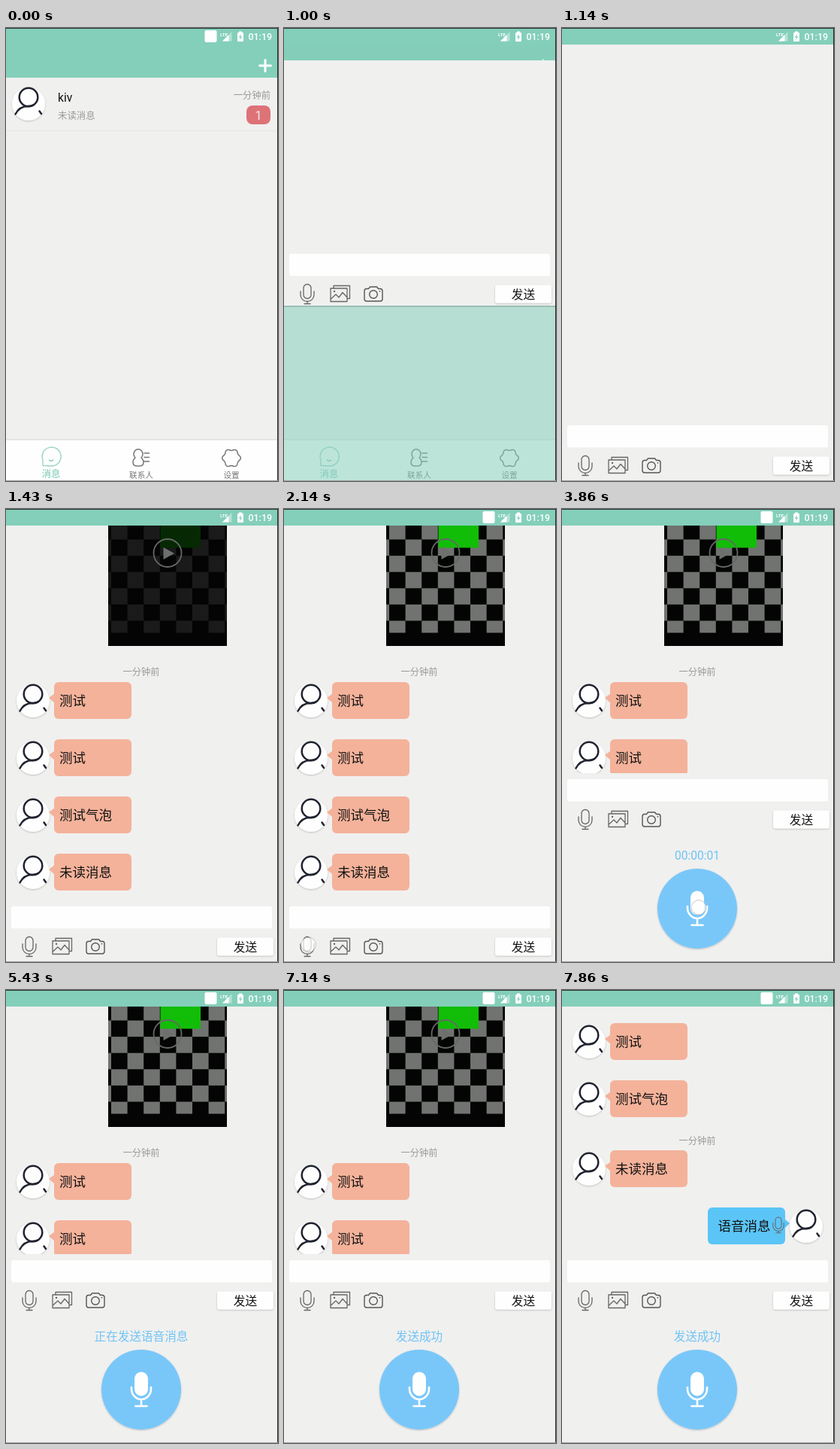
Write an HTML page that moves like this. It is 362 px wide and 602 px high and loops after 8000 ms.

```html
<!DOCTYPE html>
<html lang="zh-CN">
<head>
<meta charset="utf-8">
<title>Chat app</title>
<style>
html, body { margin: 0; width: 100%; height: 100%; overflow: hidden; background: #f0f0ef; }
svg { display: block; width: 100vw; height: 100vh; }
text { font-family: Roboto, "Noto Sans CJK SC", "Noto Sans CJK", sans-serif; }
.line { fill: none; stroke-linecap: round; stroke-linejoin: round; }
</style>
</head>
<body>
<svg id="stage" viewBox="0 0 362 602" xmlns="http://www.w3.org/2000/svg"></svg>
<script>
const LOOP = 8000;
const GREEN = '#84cfba', PAPER = '#f0f0ef', PEACH = '#f4b29a', BLUE = '#5bc5f7', SKY = '#6fc4f5';

const rect = (x, y, w, h, fill, more = '') =>
  `<rect x="${x}" y="${y}" width="${w}" height="${h}" fill="${fill}" ${more}/>`;
const circle = (x, y, r, more) => `<circle cx="${x}" cy="${y}" r="${r}" ${more}/>`;
const line = (d, color, width = 1.4) =>
  `<path class="line" d="${d}" stroke="${color}" stroke-width="${width}"/>`;
const label = (s, x, y, size, fill, anchor = 'start', more = '') =>
  `<text x="${x}" y="${y}" font-size="${size}" fill="${fill}" text-anchor="${anchor}" ${more}>${s}</text>`;
const at = (x, y, body) => `<g transform="translate(${x} ${y})">${body}</g>`;
const layer = (id, body) => `<g id="${id}">${body}</g>`;

const avatar = (x, y) => at(x, y,
  circle(0, 0, 22, 'fill="#fefefe" filter="url(#soft)"') +
  circle(0, -9, 12.3, 'fill="none" stroke="#20232f" stroke-width="2.5"') +
  line('M-17.5 13.5Q-12 3 -1 3Q4 3 7 1M14.5 9.5L17 13', '#20232f', 2.5));

const mic = (x, y, scale = 1) => at(x, y, `<g transform="scale(${scale})">` +
  rect(-5, -12.5, 10, 19, 'none', 'rx="5" stroke="#666" stroke-width="1.3"') +
  line('M-9 -3V1.5A9 9 0 0 0 9 1.5V-3M0 10.5V13.5M-4 13.5H4', '#666', 1.3) + '</g>');

const bubble = (y, s) => avatar(36, y + 25) +
  `<path d="M57 ${y + 21}L65 ${y + 15}V${y + 28}Z" fill="${PEACH}"/>` +
  rect(64, y, 103, 49, PEACH, 'rx="6"') + label(s, 71, y + 31, 17.5, '#111');

const timeNote = y => label('一分钟前', 180, y, 12.3, '#9a9a9a', 'middle');

function gearPath() {
  let d = '';
  for (let i = 0; i < 72; i++) {
    const a = i * Math.PI / 36, r = 11.2 + 1.1 * Math.cos(6 * a);
    d += (i ? 'L' : 'M') + (r * Math.cos(a)).toFixed(2) + ' ' + (r * Math.sin(a)).toFixed(2);
  }
  return d + 'Z';
}

function listScreen() {
  return rect(0, 0, 362, 602, PAPER) + rect(0, 0, 362, 66, GREEN) +
    line('M337.5 50H352.5M345 42.5V57.5', '#fff', 3) +
    rect(0, 136, 362, 1, '#e6e6e5') + avatar(30, 101) +
    label('kiv', 69, 98, 15.6, '#111') +
    label('未读消息', 69, 121, 12.4, '#999') +
    label('一分钟前', 352, 94, 12.3, '#999', 'end') +
    layer('badge', rect(320, 103, 32, 25, '#dd7377', 'rx="8"') +
      label('1', 336, 121.5, 17, '#f6e4e4', 'middle')) +
    rect(0, 546, 362, 2, '#e6e6e5') + rect(0, 548, 362, 54, '#fefefe') +
    line('M49 581.5V574A12.5 12.5 0 1 1 60 582Z', '#9ad5c5') +
    line('M57.5 574Q60 577 62.5 574', '#7fcbb6') +
    label('消息', 60, 596.5, 12.2, '#72c6b0', 'middle') +
    line('M172 571A6 6.5 0 1 1 180 571Q183 573.5 183 577Q183 582 178 582H174Q169 582 169 577Q169 573.5 172 571' +
      'M184 565H190.5M184 570.5H190.5M184 576H190.5', '#777', 1.5) +
    label('联系人', 180, 597.5, 10.6, '#777', 'middle') +
    at(300, 571.5, line(gearPath(), '#777', 1.5)) +
    label('设置', 300, 597.5, 10.6, '#777', 'middle');
}

function video() {
  const cell = 21.6, bottom = 164.5;
  let squares = '';
  for (let row = 0; row < 7; row++) {
    const y0 = row ? 40.5 + (row - 1) * cell : 22;
    const y1 = Math.min(40.5 + row * cell, bottom);
    for (let col = -1; col < 8; col++) {
      if ((row + col) % 2) continue;
      const x0 = Math.max(136, 140 + col * cell), x1 = Math.min(294, 140 + (col + 1) * cell);
      if (x1 > x0) squares += rect(x0, y0, x1 - x0, y1 - y0, '#707370');
    }
  }
  return rect(136, 22, 158, 160, '#030403') +
    layer('clip', squares + rect(205.5, 22, 53.5, 29.5, '#12bd07')) +
    circle(215, 58.5, 18.5, 'fill="none" stroke="#666866" stroke-width="1.8"') +
    '<path d="M209.5 51L224 59L209.5 67Z" fill="#6d706d"/>';
}

const firstMessages = () => video() + timeNote(221) +
  ['测试', '测试', '测试气泡', '未读消息'].map((s, i) => bubble(230 + 76 * i, s)).join('');

const lastMessages = () => bubble(44, '测试') + bubble(120, '测试气泡') +
  timeNote(204.5) + bubble(213, '未读消息') +
  `<path d="M303 310L296 304V317Z" fill="${BLUE}"/>` +
  rect(194, 289, 103, 49, BLUE, 'rx="6"') +
  label('语音消息', 207.5, 320, 17.5, '#111') + mic(288, 312, 0.8) + avatar(325, 314);

function composer() {
  return rect(0, 520, 362, 300, PAPER) +
    rect(7, 528, 347, 29.5, '#fefefe', 'rx="3"') + mic(31, 581) +
    line('M66 574V570.5H87.5V587.5H84M62 574H84V591.5H62ZM62.5 588L69 582L73 586L78 579.5L84 586', '#666', 1.3) +
    circle(67, 578, 1.2, 'fill="#666"') +
    line('M110 574.5H112.5L114.5 572H123.5L125.5 574.5H128Q131 574.5 131 577.5V588Q131 591 128 591H110Q107 591 107 588V577.5Q107 574.5 110 574.5Z', '#555', 1.4) +
    circle(119, 582, 5.3, 'fill="none" stroke="#555" stroke-width="1.4"') +
    circle(127.5, 577.8, 0.9, 'fill="#555"') +
    rect(281, 569.5, 75, 24, '#fefefe', 'rx="3" filter="url(#soft)"') +
    label('发送', 318.5, 587.5, 15.7, '#111', 'middle');
}

const recorder = () =>
  label('', 180, 465.5, 15.6, SKY, 'middle', 'id="hint"') +
  circle(180, 531, 53, 'fill="#79c7f9" filter="url(#soft)"') +
  rect(171, 507.5, 18, 32, '#fff', 'rx="9"') +
  line('M167 528V530A13 14 0 0 0 193 530V528M180 544V552.5M172.5 553H187.5', '#fff', 2.6);

const statusBar = () => rect(0, 0, 362, 22, GREEN) +
  layer('notice', rect(264.5, 3, 16, 16, '#fff', 'rx="2"')) +
  label('LTE', 285, 10.5, 6.2, '#fff', 'start', 'font-weight="700"') +
  '<path d="M288 17.5L300.5 5V17.5Z" fill="#fff" opacity=".4"/>' +
  '<path d="M288 17.5L296.5 9V17.5Z" fill="#fff"/>' +
  rect(308, 6, 8, 12, '#fff', 'rx="1"') + rect(310, 4.5, 4, 2, '#fff') +
  `<path d="M312.8 8L309.8 12.6H311.8L311.2 16L314.3 11.4H312.3Z" fill="${GREEN}"/>` +
  label('01:19', 354, 16, 12.4, '#fff', 'end', 'font-weight="500"');

document.getElementById('stage').innerHTML =
  `<defs>
    <filter id="soft" x="-20%" y="-20%" width="140%" height="150%">
      <feDropShadow dx="0" dy="1" stdDeviation="1" flood-color="#000" flood-opacity=".22"/>
    </filter>
    <clipPath id="window"><rect id="frame" x="0" width="362"/></clipPath>
  </defs>` +
  listScreen() +
  layer('tint', rect(0, 0, 362, 602, GREEN, 'opacity=".53"')) +
  '<g id="chat" clip-path="url(#window)">' +
    rect(0, 22, 362, 580, PAPER) +
    layer('first', firstMessages()) + layer('last', lastMessages()) +
    layer('composer', composer()) + layer('recorder', recorder()) +
  '</g>' +
  layer('edge', rect(0, 369, 362, 1.5, '#8fb5a8')) +
  statusBar() +
  circle(0, 0, 9.8, 'id="touch" fill="#fff" fill-opacity=".72" stroke="#999" stroke-opacity=".55"') +
  rect(0, 0, 362, 1, '#2b3a36') + rect(361, 0, 1, 602, '#2a2a2a') + rect(0, 601, 362, 1, '#a3a3a3');

const el = {};
document.querySelectorAll('[id]').forEach(n => el[n.id] = n);

const show = (id, on) => el[id].setAttribute('display', on ? 'inline' : 'none');
const within = (t, a, b) => t >= a && t < b;

// Taps: start, release, end, x, y
const taps = [
  [570, 710, 860, 263.5, 107.5],
  [2140, 2290, 2430, 32.5, 579],
  [2860, 5290, 5430, 182, 529.5]
];

function hintAt(t) {
  if (t < 2860) return '按住开始录音，松开后发送';
  if (t < 5290) return '00:00:0' + Math.floor((t - 2860) / 1000);
  return t < 7140 ? '正在发送语音消息' : '发送成功';
}

function render(t) {
  const opening = within(t, 1000, 1140), recording = t >= 2290;

  show('badge', t < 860);
  show('tint', opening);
  show('edge', opening);
  show('chat', t >= 1000);
  el.frame.setAttribute('y', opening ? 43 : 22);
  el.frame.setAttribute('height', opening ? 326 : 580);

  show('first', within(t, 1430, 7430));
  show('last', t >= 7430);
  el.clip.setAttribute('opacity', t < 1570 ? 0.2 : t < 1710 ? 0.6 : 1);
  const lift = opening ? -228 : recording ? -169 : 0;
  el.composer.setAttribute('transform', `translate(0 ${lift})`);

  show('recorder', recording);
  const hint = hintAt(t);
  if (el.hint.textContent !== hint) el.hint.textContent = hint;

  show('notice', t < 860 || within(t, 1290, 1430) || within(t, 1860, 7430) || t >= 7860);

  const tap = taps.find(p => within(t, p[0], p[2]));
  show('touch', tap);
  if (tap) {
    el.touch.setAttribute('cx', tap[3]);
    el.touch.setAttribute('cy', tap[4]);
    el.touch.setAttribute('opacity', t < tap[1] ? 1 : 0.5);
  }
}

const start = performance.now();
function tick() {
  render((performance.now() - start) % LOOP);
  requestAnimationFrame(tick);
}
render(0);
requestAnimationFrame(tick);
</script>
</body>
</html>
```
